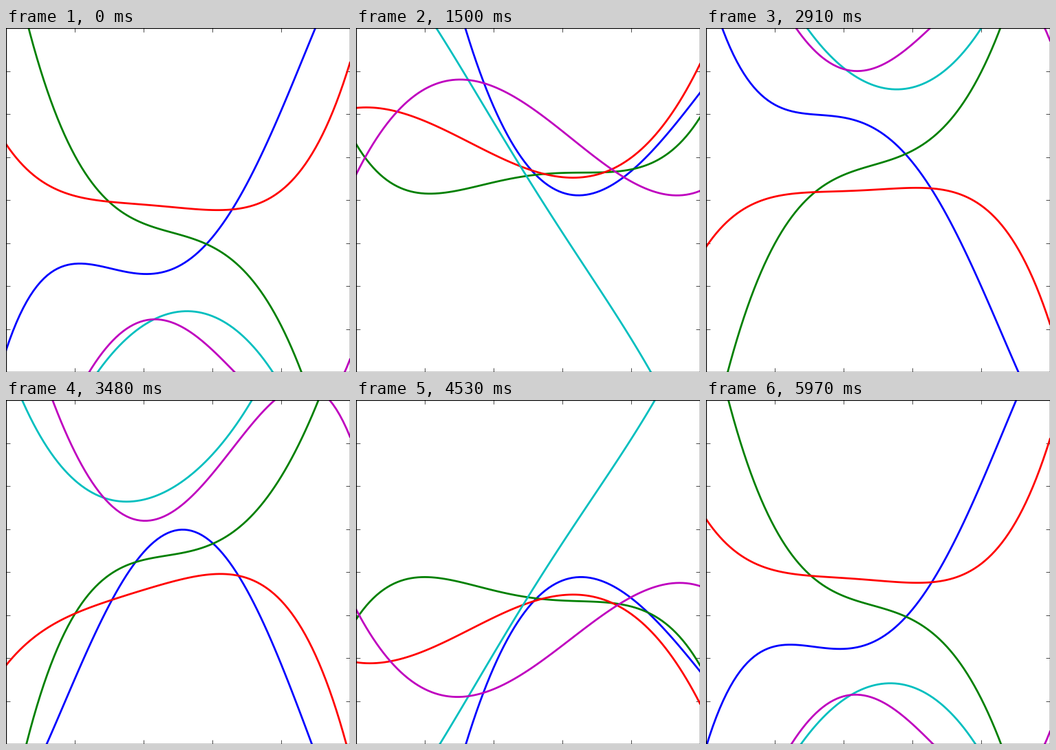
Animation, 500 px wide and 500 px high, one loop 6000 ms. Source, as a matplotlib script:

```python
import numpy as np
import matplotlib.pyplot as plt
from matplotlib.animation import FuncAnimation
from numpy.polynomial import Polynomial as Poly

SIZE, DPI = 500, 100
FRAMES, INTERVAL = 200, 30
HALF = SIZE / 2

# Each curve turns on a circle between two quartics, coefficients from
# the constant term up, in pixels: y = cos(t) p(x) + sin(t) q(x).
CURVES = {
    "b": (Poly([-96.7, 126.9, 406.2, 163.1, -238.1]),
          Poly([49.1, -305, 604, -192.3])),
    "g": (Poly([-49.7, -70.2, -39.3, -377.5, 36.7]),
          Poly([35.2, 34.8, -72.8, -15.6, 138.4])),
    "r": (Poly([-11.1, -23, 5.9, 82.2, 145.7]),
          Poly([44.9, -87.2, 119.7, 119.1, 1.1])),
    "c": (Poly([-162.5, 34, -322.5, -16.3, -62.5]),
          Poly([31.2, -401.6, 44.8, 10.4, -81.1])),
    "m": (Poly([-181.6, -117.3, -387, 278.4, 175.9]),
          Poly([137.4, -168.3, -124.8, 156.5, 12.4])),
}

fig = plt.figure(figsize=(SIZE / DPI, SIZE / DPI), dpi=DPI, facecolor="white")
ax = fig.add_axes([0, 0, 1, 1])
ax.set_xlim(-1, 1)
ax.set_ylim(-HALF, HALF)
ax.set_xticks(np.linspace(-1, 1, 6))
ax.set_yticks(np.linspace(-HALF, HALF, 9))
ax.tick_params(direction="in", length=4, width=0.5, top=True, right=True,
               labelbottom=False, labelleft=False)
for spine in ax.spines.values():
    spine.set_linewidth(1)

x = np.linspace(-1, 1, 101)
lines = {color: ax.plot([], [], color=color, lw=2)[0] for color in CURVES}


def update(frame):
    t = 2 * np.pi * frame / FRAMES
    for color, (p, q) in CURVES.items():
        lines[color].set_data(x, np.cos(t) * p(x) + np.sin(t) * q(x))
    return list(lines.values())


anim = FuncAnimation(fig, update, frames=FRAMES, interval=INTERVAL,
                     repeat=True, repeat_delay=0, blit=False)
plt.show()
```
